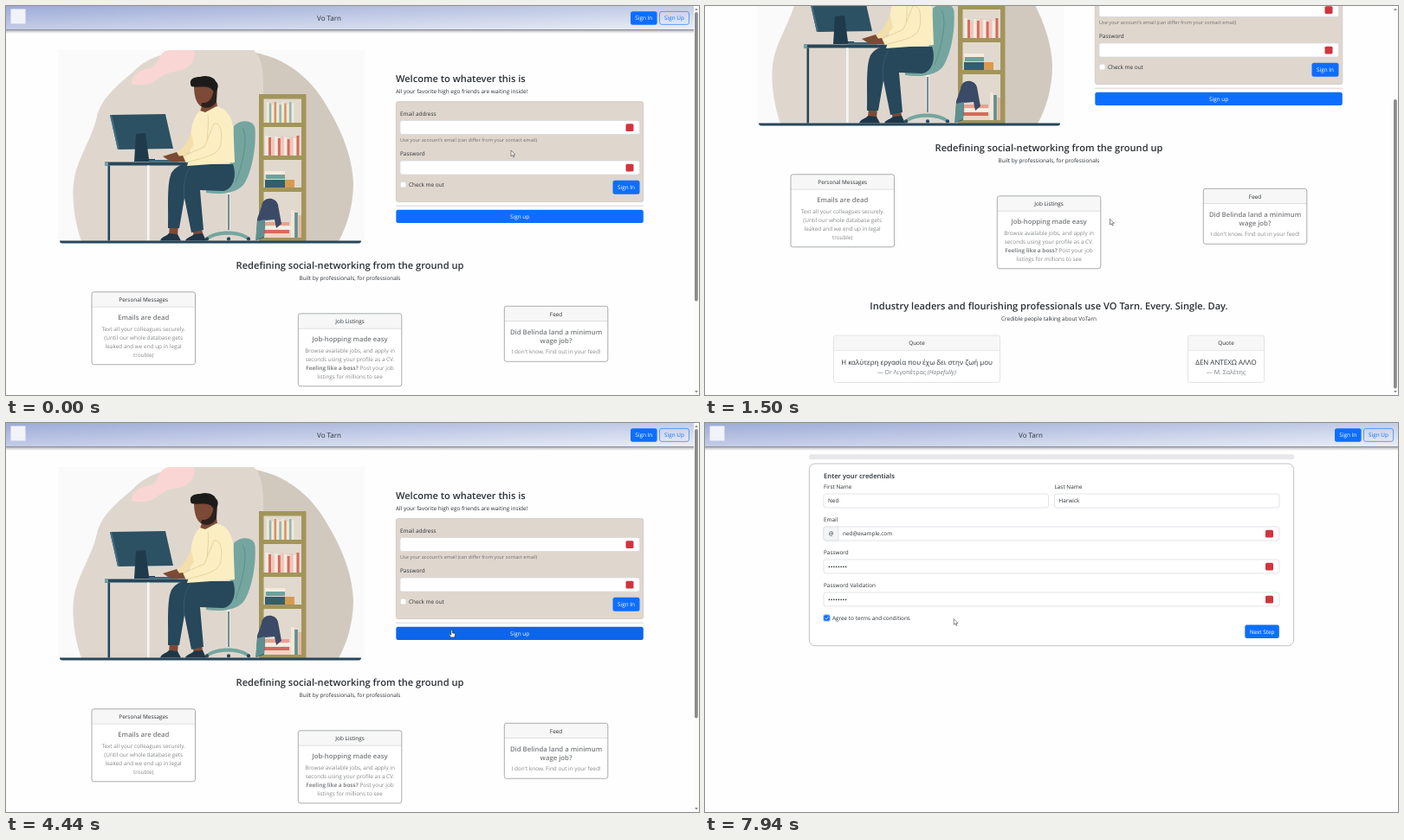
An HTML page with a canvas that plays this animation: 800x450 px, repeating every 8 s.

```html
<!DOCTYPE html>
<html lang="en">
<head>
<meta charset="utf-8">
<title>Landing page walkthrough</title>
<style>
html, body { margin: 0; width: 100%; height: 100%; overflow: hidden; background: #fefefe; }
canvas { display: block; width: 800px; height: 450px; }
</style>
</head>
<body>
<canvas id="stage"></canvas>
<script>
const LOOP = 8000, MAX_SCROLL = 136, HOVER_AT = 4340, NAV_AT = 5950, CHECK_AT = 7450;
const INK = '#2b3035', BLUE = '#0d6efd', GREY = '#85888b', RED = '#d0353f';
const NAVY = '#27475a', SKIN = '#7c4a36', OLIVE = '#a2955a', TEAL = '#74a69f';

const canvas = document.getElementById('stage');
const ratio = window.devicePixelRatio || 1;
canvas.width = 800 * ratio;
canvas.height = 450 * ratio;
const c = canvas.getContext('2d');

const clamp = u => Math.min(1, Math.max(0, u));
const ease = u => u * u * (3 - 2 * u);
const ramp = (t, from, to) => ease(clamp((t - from) / (to - from)));

function box(x, y, w, h, r, fill, stroke, line = 0.7) {
  c.beginPath();
  c.roundRect(x, y, w, h, r);
  if (fill) { c.fillStyle = fill; c.fill(); }
  if (stroke) { c.strokeStyle = stroke; c.lineWidth = line; c.stroke(); }
}

function shape(d, fill, stroke, line = 1) {
  const p = new Path2D(d);
  if (fill) { c.fillStyle = fill; c.fill(p); }
  if (stroke) { c.strokeStyle = stroke; c.lineWidth = line; c.stroke(p); }
}

function setFont(size, style) {
  c.font = `${style} ${size}px "Open Sans", "Noto Sans", sans-serif`;
}

// y is the middle of the capitals
function text(s, x, y, { size = 6.4, color = INK, align = 'left', style = '400' } = {}) {
  setFont(size, style);
  c.textAlign = align;
  c.fillStyle = color;
  c.fillText(s, x, y + size * 0.36);
}

const centered = (s, x, y, opt = {}) => text(s, x, y, { ...opt, align: 'center' });

// centered line made of [text, style] parts
function runs(parts, x, y, size, color) {
  const widths = parts.map(([s, style]) => {
    setFont(size, style);
    return c.measureText(s).width;
  });
  x -= widths.reduce((a, b) => a + b) / 2;
  parts.forEach(([s, style], i) => {
    text(s, x, y, { size, color, style });
    x += widths[i];
  });
}

function button(s, x, y, w, h, fill = BLUE) {
  box(x, y, w, h, 2.5, fill);
  centered(s, x + w / 2, y + h / 2, { color: '#fff' });
}

function input(x, y, w, icon) {
  box(x, y, w, 16, 2.5, '#fff', '#d5d9de');
  if (icon) box(x + w - 16, y + 3.7, 9, 8.8, 1.6, RED);
}

// gradient running from the top left corner to the bottom right one
function cornerGradient(w, h) {
  const k = w * h / (w * w + h * h);
  const dx = h * k, dy = w * k;
  return c.createLinearGradient(w / 2 - dx, h / 2 - dy, w / 2 + dx, h / 2 + dy);
}

function header(width) {
  const fade = c.createLinearGradient(0, 27, 0, 32);
  fade.addColorStop(0, 'rgba(55,58,75,.65)');
  fade.addColorStop(0.4, 'rgba(70,72,85,.28)');
  fade.addColorStop(1, 'rgba(90,90,100,0)');
  c.fillStyle = fade;
  c.fillRect(0, 27, width, 5);
  const g = cornerGradient(width, 27);
  g.addColorStop(0, '#9dabd7');
  g.addColorStop(1, '#eaeef6');
  c.fillStyle = g;
  c.fillRect(0, 0, width, 27);
  box(5.5, 3.5, 17, 17, 0, '#f1f3f9');
  centered('Vo Tarn', width / 2 - 24, 14, { size: 8 });
  button('Sign In', width - 73, 6.2, 30.6, 15.5);
  box(width - 39.5, 6.4, 34, 15, 2.5, null, BLUE, 0.6);
  centered('Sign Up', width - 22.5, 14, { color: BLUE });
}

function backdrop() {
  box(60, 51, 354, 224, [0, 0, 5, 5], '#fafafa');
  shape('M200 51H262C292 52 314 60 331 72C350 85 362 101 371 117C385 140 400 172 401 205C401 232 393 256 384 272H200Z', '#d2c9be');
  shape('M147 76C165 56 195 51 230 51H286C294 58 297 72 297 92C298 125 293 160 294 272H87C78 246 74 212 81 190C87 170 100 150 105 128C109 108 128 92 147 76Z', '#dfd7ce');
  shape('M145 90C145 78 156 74 166 72C179 69 173 52 190 51H217C220 65 210 74 194 76C177 78 174 91 158 91C151 91 147 91 145 90Z', '#f9d6d3');
}

function bookcase() {
  box(292, 102, 54.5, 170, 0, OLIVE);
  for (const [y, h] of [[107.5, 27.5], [140, 33], [178, 32], [215, 53]]) box(297.5, y, 43.5, h, 0, '#e1d9cd');
  const cool = ['#f3e9d8', '#8fb8b1', '#f5ead6', '#d9905e'];
  const warm = ['#f5ece0', '#d9685b', '#f2c3b9'];
  for (let i = 0; i < 11; i++) {
    box(301 + i * 2.9, 111 + (i % 3) * 1.5, 2.3, 24 - (i % 3) * 1.5, 0, cool[i % 4]);
    box(299.5 + i * 3.6, 150 + (i * 2) % 5, 2.9, 23 - (i * 2) % 5, 0, warm[i % 3]);
  }
  box(299, 191, 23, 4, 0, '#f4ecdf');
  box(300, 195, 22, 5, 0, '#6ba39d');
  box(299, 201, 23, 9, 0, '#345e6c');
  box(322, 201, 11, 9, 0, '#d69b52');
  for (let i = 0; i < 4; i++) box(298 + i % 2 * 2, 250 + i * 4.5, 29, 4, 0, ['#e9a18f', '#f6eee3', '#d9685b', '#f4d2c5'][i]);
  for (let i = 0; i < 3; i++) box(329 + i * 4.2, 236 + i * 3, 3.6, 32 - i * 3, 0, ['#f1e7da', '#5f8f8f', '#e2b7a3'][i]);
  shape('M295 232C296 220 311 220 314 230L318 252L312 257L310 247L299 248L298 268L289 271L290 246Z', '#3b4a66');
  shape('M290 249L299 247L298 267L288 271Z', '#5f8f8f');
}

function chair() {
  shape('M263 139C270 131 286 131 287.5 142C289 164 284 190 276 204C269 216 250 219 231 216L231 211L256 207Z', TEAL);
  shape('M273 141C280 152 273 184 265 204', null, '#5c918c', 1);
  shape('M257 216V259', null, '#edf0ee', 3);
  shape('M257 218V259', null, NAVY, 1.2);
  shape('M231 268C240 258 272 258 281 268L278 270C268 263 244 263 234 270Z', TEAL);
  for (const x of [232, 257, 280]) { c.beginPath(); c.arc(x, 269.4, 2.1, 0, 7); c.fillStyle = NAVY; c.fill(); }
}

function desk() {
  shape('M120 126L184 125L193 165L129 166Z', '#2c5163');
  shape('M120 126L122 126L131 166L129 166Z', '#47707f');
  shape('M150 148L161 147L165 177H172V180H148Z', '#1f3b4b');
  box(114, 180.5, 97, 4, 0, NAVY);
  box(114, 180.5, 4, 4, 0, '#6fa3a4');
  box(117.5, 184.5, 2.6, 87, 0, NAVY);
  box(163, 184.5, 2.6, 87, 0, '#f6f6f4');
  box(165, 178, 34, 2.5, 1, '#3d6677');
}

function person() {
  shape('M189 252H199L198 267H188Z', SKIN);
  shape('M215 256L225 254L228 267H217Z', SKIN);
  shape('M188 263L198 264L202 271.5H178C180 266 185 267 188 263Z', '#1e3646');
  shape('M217 264L227 263L231 271.5H207C208 268 214 267 217 264Z', '#1e3646');
  shape('M206 183H262C267 197 262 213 250 214L224 213L228 259L214 262L206 222L200 257H187C188 238 185 206 191 193C195 187 200 184 206 183Z', NAVY);
  shape('M212 187C207 195 204 207 206 222', null, '#3d6072', 0.8);
  shape('M228 110H243L245 123L233 128L224 122Z', SKIN);
  shape('M224 121L230 123L243 116C255 119 261 128 262.5 142L264 181L209 185C214 171 212 155 214 143C216 131 219 126 224 121Z', '#fbeec2');
  shape('M233 126C235 138 231 150 233 160', null, '#e2cf99', 0.8);
  shape('M214 147C209 156 207 163 198 169L183 173L185 177L205 175L217 161Z', '#f3dfa9');
  shape('M181 174L197 169L200 174L187 178Z', SKIN);
  shape('M240 136C250 134 250 153 247 163C243 174 221 177 208 181L204 174L229 163Z', '#fbeec2', '#dbc78e', 0.7);
  shape('M186 176L204 173L207 180L190 180Z', SKIN);
  shape('M217 92C224 88 240 89 243 95L241 111C238 117 232 120 227 117C219 114 217 102 217 92Z', SKIN);
  shape('M240 95L244 94L243 110C240 117 232 120 225 116L226 112C234 113 239 107 240 95Z', '#2d211d');
  shape('M214 93C210 84 218 82 224 82C232 79 241 83 242 87C247 92 244 97 241 100L236 95C229 92 220 95 214 93Z', '#1d1b1a');
}

function illustration() {
  backdrop();
  bookcase();
  chair();
  desk();
  person();
  box(62, 271.6, 348, 3, [0, 0, 3, 3], NAVY);
}

function loginForm(hover) {
  text('Welcome to whatever this is', 450, 84.5, { size: 11.05, style: '600' });
  text('All your favorite high ego friends are waiting inside!', 450, 99);
  box(450.3, 110.5, 285.5, 116, 2.6, '#dfd6cd', '#cbc5be');
  text('Email address', 455, 124.5);
  input(455, 132.5, 276.5, true);
  text("Use your account's email (can differ from your contact email)", 455, 154.8, { size: 5.6, color: '#6f7173' });
  text('Password', 455, 171);
  input(455, 179, 276.5, true);
  box(455.3, 203.3, 6.6, 6.6, 1.6, '#fff', '#c9c9c9', 0.5);
  text('Check me out', 465, 206.8);
  button('Sign In', 700.5, 201.7, 31, 16);
  box(450, 230.7, 286, 0.8, 0, '#c4c6c8');
  const mix = (a, b) => Math.round(a + (b - a) * hover);
  button('Sign up', 450.3, 235.7, 285.5, 15.4, `rgb(${mix(13, 11)},${mix(110, 94)},${mix(253, 218)})`);
}

function card(title, x, y, w, h, border) {
  box(x, y, w, h, 2.6, '#fff');
  box(x, y, w, 17, [2.6, 2.6, 0, 0], '#f7f7f7');
  box(x, y + 17, w, 0.6, 0, '#d2d4d6');
  box(x, y, w, h, 2.6, null, border, 0.8);
  centered(title, x + w / 2, y + 9);
}

function cards() {
  const head = { size: 7.75, color: '#777a7d', style: '600' };
  const body = { color: GREY };
  const edge = '#96989a';
  card('Personal Messages', 99, 330.8, 119.5, 84, edge);
  centered('Emails are dead', 158.7, 360.3, head);
  ['Text all your colleagues securely.', '(Until our whole database gets', 'leaked and we end up in legal', 'trouble)']
    .forEach((s, i) => centered(s, 158.7, 373.4 + i * 10, body));

  card('Job Listings', 337.3, 355.8, 119.5, 84, edge);
  centered('Job-hopping made easy', 397, 385.3, head);
  centered('Browse available jobs, and apply in', 397, 398.3, body);
  centered('seconds using your profile as a CV.', 397, 408.3, body);
  runs([['Feeling like a boss?', '700'], [' Post your job', '400']], 397, 418.3, 6.4, GREY);
  centered('listings for millions to see', 397, 428.3, body);

  card('Feed', 575.3, 347.3, 119.5, 64, edge);
  centered('Did Belinda land a minimum', 635, 376.8, head);
  centered('wage job?', 635, 386.9, head);
  centered("I don't know. Find out in your feed!", 635, 400, body);
}

function quotes() {
  const title = { size: 11.1, style: '600' };
  centered('Redefining social-networking from the ground up', 397, 300, title);
  centered('Built by professionals, for professionals', 397, 315);
  centered('Industry leaders and flourishing professionals use VO Tarn. Every. Single. Day.', 397, 483, title);
  centered('Credible people talking about VoTarn', 397, 498);
  card('Quote', 148.5, 517, 192, 54.5, '#dcdee0');
  centered('Η καλύτερη εργασία που έχω δει στην ζωή μου', 244.5, 548, { size: 7.95 });
  runs([['— Dr Λιγοπέτρας ', '400'], ['(Hopefully)', 'italic 400']], 244.5, 559.3, 7, '#747a80');
  card('Quote', 557.5, 517, 88, 54.5, '#dcdee0');
  centered('ΔΕΝ ΑΝΤΕΧΩ ΑΛΛΟ', 601.5, 548, { size: 7.95 });
  centered('— Μ. Σαλέτης', 601.5, 559.3, { size: 7, color: '#747a80' });
}

function scrollbar(scroll) {
  box(794, 0, 6, 450, 0, '#fcfcfc');
  box(795, 7 + scroll / MAX_SCROLL * 101, 3.8, 334.5, 1.9, '#8b8b8b');
  shape('M795 5L797 2.5L799 5Z', '#8b8b8b');
  shape('M795 445L797 447.5L799 445Z', '#8b8b8b');
}

function landing(t) {
  const scroll = MAX_SCROLL * (ramp(t, 930, 1430) - ramp(t, 2950, 3400));
  c.save();
  c.translate(0, -scroll);
  header(794);
  illustration();
  loginForm(ramp(t, HOVER_AT, HOVER_AT + 200));
  cards();
  quotes();
  c.restore();
  scrollbar(scroll);
}

function signup(t) {
  header(800);
  box(120, 36.3, 560, 6, 2.6, '#e8e8eb');
  box(120.4, 47, 559.2, 210.7, 6.5, '#fff', '#b9bbbe', 0.9);
  text('Enter your credentials', 137, 61, { size: 7.7, style: '600' });
  text('First Name', 137, 74);
  input(137, 82, 259.5);
  text('Ned', 142, 90);
  text('Last Name', 403.5, 74);
  input(403.5, 82, 259.5);
  text('Harwick', 408.5, 90);
  text('Email', 137, 112);
  input(137, 120, 526, true);
  box(137, 120, 17, 16, [2.5, 0, 0, 2.5], '#f3f4f5', '#d5d9de');
  centered('@', 145.5, 128);
  text('ned@example.com', 159, 128);
  ['Password', 'Password Validation'].forEach((s, i) => {
    const y = 150 + i * 38;
    text(s, 137, y);
    input(137, y + 8, 526, true);
    text('••••••••', 142, y + 16.2, { size: 7.3 });
  });
  if (t >= CHECK_AT) {
    box(136, 221, 9, 9, 2.4, '#b9d5fe');
    box(137.2, 222.2, 6.6, 6.6, 1.6, BLUE);
    shape('M138.8 225.6L140.1 226.9L142.4 224.2', null, '#fff', 0.9);
  } else {
    box(137.2, 222.2, 6.6, 6.6, 1.6, '#fff', '#c2c4c6', 0.6);
  }
  text('Agree to terms and conditions', 147, 225.8);
  button('Next Step', 623.3, 233.5, 39.5, 15.6);
}

// time, x, y of the pointer tip
const PATH = [
  [0, 583, 167], [120, 583, 167], [760, 467.5, 246.3], [1700, 467.5, 246.3],
  [2500, 469.5, 246.5], [4180, 469.5, 246.5], [4440, 514.5, 239.3], [4600, 514.5, 239.3],
  [5200, 585, 240], [5680, 587, 241], [5800, 589.3, 317.3], [6000, 589.3, 317.3],
  [6900, 140.5, 225], [7480, 140.5, 225], [7820, 287.2, 226.5], [LOOP, 287.2, 226.5]
];

function pointer(t) {
  const i = PATH.findIndex((p, k) => k && t <= p[0]);
  const [t0, x0, y0] = PATH[i - 1], [t1, x1, y1] = PATH[i];
  const u = ramp(t, t0, t1);
  c.save();
  c.translate(x0 + (x1 - x0) * u, y0 + (y1 - y0) * u);
  c.lineJoin = 'round';
  if (t > HOVER_AT && t < 5720) {
    shape('M-.8 .8Q0 -.4 .8 .8V3.5L3.6 4.3Q4.2 4.6 4 5.6L3.3 8.6H-1L-3 5.8Q-2.6 4.7-.8 6Z', '#fff', '#222', 0.6);
  } else {
    shape('M0 0V6.8L1.6 5.4L2.7 7.9L3.8 7.4L2.7 5H4.9Z', '#fff', '#444', 0.6);
  }
  c.restore();
}

function draw(now) {
  const t = now % LOOP;
  c.setTransform(ratio, 0, 0, ratio, 0, 0);
  c.textRendering = 'geometricPrecision';
  c.fillStyle = '#fefefe';
  c.fillRect(0, 0, 800, 450);
  if (t < NAV_AT) landing(t); else signup(t);
  pointer(t);
}

const start = performance.now();
function tick() {
  draw(performance.now() - start);
  requestAnimationFrame(tick);
}
tick();
</script>
</body>
</html>
```
